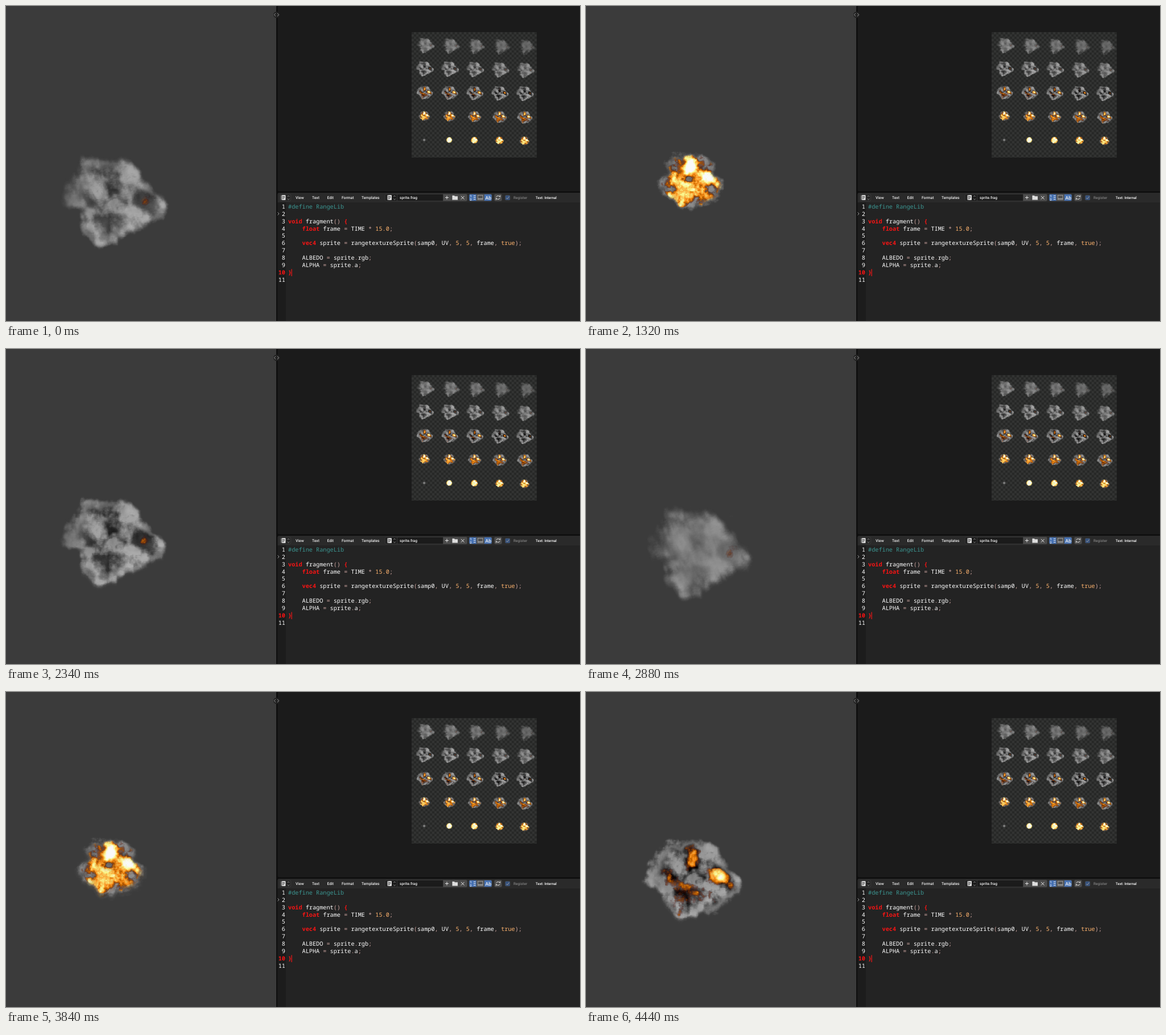
Write an HTML page with a canvas that moves like this. It is 1009 px wide and 555 px high and loops after 4500 ms.

```html
<!DOCTYPE html>
<html lang="en">
<head>
<meta charset="utf-8">
<title>Sprite sheet explosion</title>
<style>
html, body { margin: 0; width: 100%; height: 100%; overflow: hidden; background: #3b3b3b; }
svg, canvas { position: absolute; left: 0; top: 0; }
#view { left: 54px; top: 222px; }
#sheet { left: 713px; top: 46px; }
text { white-space: pre; text-rendering: geometricPrecision; }
#menu { font: 500 6.7px Roboto, sans-serif; fill: #f0f0f0; }
#code { font: 500 10.23px "Noto Sans Mono", "DejaVu Sans Mono", monospace; fill: #fff; }
.key { fill: #f81414; font-weight: 600; }
.num { fill: #ffb46e; }
.pre { fill: #3c9591; }
.sym { fill: #cda5a0; }
</style>
</head>
<body>
<svg width="1009" height="555">
  <rect x="475" width="534" height="555" fill="#0e0e0e"/>
  <rect x="477.5" width="540" height="326.500" rx="3" fill="#1b1b1b"/>
  <rect x="477.5" y="329" width="540" height="230" rx="3" fill="#232323"/>
  <rect x="477.5" y="346" width="14.500" height="209" fill="#1c1c1c"/>
  <path d="M477.500 346V332q0-3 3-3H1009V346z" fill="#2a2a2a"/>
  <circle cx="475.500" cy="15.500" r="5.500" fill="#222"/>
  <g fill="none" stroke="#aaa" stroke-width=".9">
    <path d="M474 12.800L471.300 15.500L474 18.200M477 12.800L479.700 15.500L477 18.200"/>
    <path d="M477.500 363.500L480 366L477.500 368.500"/>
  </g>
  <g stroke="#474747" stroke-width=".6">
    <rect x="481.500" y="331.500" width="19" height="12" rx="2" fill="#242424"/>
    <rect x="666.500" y="331.500" width="144" height="12" rx="2" fill="#1b1b1b"/>
    <path d="M687.500 331.500V343.500"/>
    <path d="M768.500 331.500H808.500q2 0 2 2V341.500q0 2-2 2H768.500z" fill="#4c4c4c"/>
    <path d="M782.500 331.500V343.500M796.500 331.500V343.500" stroke="#333"/>
    <rect x="814" y="331.500" width="40" height="12" rx="2" fill="#4772b3"/>
    <rect x="827" y="331.500" width="13.500" height="12" fill="#505050"/>
    <rect x="858.500" y="331.500" width="13" height="12" rx="2" fill="#4c4c4c"/>
    <rect x="877.500" y="333.500" width="8.500" height="8.500" rx="1.500" fill="#35517d"/>
  </g>
  <g fill="none" stroke="#e2e2e2" stroke-width="1">
    <path d="M775 334.500V340.500M772 337.500H778M800 335L805.500 340.500M805.500 335L800 340.500"/>
    <path d="M822 334.500H825.500M822 337.500H825.500M822 340.500H825.500"/>
    <rect x="829.500" y="333.500" width="8.500" height="7.500" stroke="#aaa" stroke-width=".8"/>
    <path d="M830 339.500H838" stroke="#aaa"/>
    <path d="M861.500 336.500q3.500-4 7 0V333.500M868.500 338.500q-3.500 4-7 0V341.500"/>
    <path d="M879.500 338L881.300 340L884.500 335.500" stroke="#9a9a9a"/>
    <path d="M494.800 336L496.500 334L498.200 336M494.800 339.500L496.500 341.500L498.200 339.500M681.300 336L683 334L684.700 336M681.300 339.500L683 341.500L684.700 339.500" stroke="#999" stroke-width=".8"/>
  </g>
  <path d="M784.500 334h3.500l1 1.200h5V341.500h-9.500z" fill="#ddd"/>
  <g id="docs"></g>
  <g id="menu"></g>
  <g id="code"></g>
  <rect x="501.500" y="463.500" width="1.200" height="12.500" fill="#f81414"/>
</svg>
<canvas id="sheet" width="220" height="221"></canvas>
<canvas id="view" width="256" height="256"></canvas>

<script>
const $ = id => document.getElementById(id);
const SIZE = 256, LEFT = 54, TOP = 222, COUNT = 25;

// Editor text
$("docs").innerHTML = [483.5, 670].map(x =>
  `<rect x="${x}" y="333" width="8" height="9" rx="1" fill="#ddd"/>` +
  `<path d="M${x + 2.5} 335.500h4M${x + 2.5} 337.500h4M${x + 2.5} 339.500h2.500M${x + 1.2} 333V342" stroke="#333" stroke-width=".9"/>`).join("");

$("menu").innerHTML = [
  [509, "View"], [538, "Text"], [564.5, "Edit"], [590, "Format"], [625, "Templates"],
  [692, "sprite.frag"], [892, "Register", 'fill="#808080" font-size="6.500"'],
  [931, "Text: Internal", 'fill="#fff" font-size="6.300"'],
  [815.5, "1", 'font-size="5.500" dy="-3.300"'], [815.5, "2", 'font-size="5.500" dy="2.700"'],
  [842.5, "Ab", 'font-size="8.500" dy=".5"']
].map(([x, s, more = ""]) => `<text x="${x}" y="340.300" ${more}>${s}</text>`).join("");

const code = `#define RangeLib

void fragment() {
    float frame = TIME * 15.0;

    vec4 sprite = rangetextureSprite(samp0, UV, 5, 5, frame, true);

    ALBEDO = sprite.rgb;
    ALPHA = sprite.a;
}
`;
const token = /(#.*)|(\b(?:void|float|vec4)\b|[{}])|(\btrue\b|\b\d[\d.]*)|([()=*;,.]+)/g;
const paint = s => s.replace(token, (m, pre, key, num) =>
  `<tspan class="${pre ? "pre" : key ? "key" : num ? "num" : "sym"}">${m}</tspan>`);
$("code").innerHTML = code.split("\n").map((s, n) => {
  const y = 356.6 + 12.97 * n;
  return `<text x="491" y="${y}" text-anchor="end"${n == 9 ? ' class="key"' : ""}>${n + 1}</text>` +
    `<text x="496" y="${y}">${paint(s)}</text>`;
}).join("");

// Maths helpers
const clamp = v => v < 0 ? 0 : v > 1 ? 1 : v;
const mix = (a, b, k) => a + (b - a) * k;
const smooth = (a, b, v) => { v = clamp((v - a) / (b - a)); return v * v * (3 - 2 * v); };

// Piecewise linear curve through position, value pairs
function curve(i, ...p) {
  if (i <= p[0]) return p[1];
  for (let k = 2; k < p.length; k += 2)
    if (i <= p[k]) return mix(p[k - 1], p[k + 1], (i - p[k - 2]) / (p[k] - p[k - 2]));
  return p[p.length - 1];
}

let seed = 7;
function random() {
  seed = (Math.imul(seed, 1664525) + 1013904223) >>> 0;
  return seed / 4294967296;
}

// Tiling fractal noise; billow folds it into cauliflower creases
function makeNoise(billow) {
  const out = new Float32Array(SIZE * SIZE);
  for (let p = 8, amp = 0.48; p <= 128; p *= 2, amp *= 0.55) {
    const grid = Array.from({ length: p * p }, random);
    for (let y = 0; y < SIZE; y++) for (let x = 0; x < SIZE; x++) {
      const gx = x * p / SIZE, gy = y * p / SIZE, x0 = gx | 0, y0 = gy | 0;
      const x1 = (x0 + 1) % p, y1 = (y0 + 1) % p;
      const u = smooth(0, 1, gx - x0), v = smooth(0, 1, gy - y0);
      const n = mix(mix(grid[y0 * p + x0], grid[y0 * p + x1], u), mix(grid[y1 * p + x0], grid[y1 * p + x1], u), v);
      out[y * SIZE + x] += amp * (billow ? Math.abs(2 * n - 1) : n);
    }
  }
  return out;
}
const cloud = makeNoise(false), puff = makeNoise(true);
const sample = (f, x, y) => f[(Math.floor(y) & 255) * SIZE + (Math.floor(x) & 255)];

// Outline radii, clockwise from the right in steps of 18 degrees
const ball = Array(20).fill(31);
const blast = [55, 60, 57, 51, 52, 53, 53, 52, 52, 60, 56, 50, 58, 58, 52, 53, 51, 55, 58, 50];
const embers = [81, 84, 73, 73, 68, 69, 75, 71, 58, 76, 83, 78, 80, 76, 66, 72, 67, 76, 67, 70];
const smoke = [98, 92, 77, 68, 67, 74, 88, 90, 70, 62, 96, 88, 84, 92, 79, 77, 84, 80, 67, 80];
const haze = [98, 88, 70, 62, 72, 82, 88, 82, 70, 72, 80, 80, 84, 86, 82, 80, 80, 78, 78, 88];

function makeSprite(i) {
  const canvas = document.createElement("canvas");
  canvas.width = canvas.height = SIZE;
  const ctx = canvas.getContext("2d"), image = ctx.createImageData(SIZE, SIZE), px = image.data;
  const cx = curve(i, 1, 182, 5, 183, 10, 187, 16, 187, 24, 202);
  const cy = curve(i, 1, 298, 5, 308, 10, 325, 16, 340, 24, 368);
  const outline = ball.map((r, k) => curve(i, 0, 14, 1, r, 5, blast[k], 10, embers[k], 16, smoke[k], 24, haze[k]));
  const unit = curve(i, 0, 14, 1, 31, 5, 54, 10, 75, 16, 82, 24, 84);

  const wobble = curve(i, 0, 3, 1, 5, 3, 16, 5, 20, 10, 26, 16, 30, 24, 50);
  const soft = curve(i, 0, 3, 1, 4, 5, 12, 10, 12, 16, 18, 20, 28, 24, 46);
  const fade = curve(i, 16, 0.97, 20, 0.82, 24, 0.55);
  const dark = curve(i, 5, 0.7, 8, 1, 13, 1, 15, 0.75, 17, 0.6, 20, 0.25, 24, 0);
  const heat = curve(i, 1, 0.95, 2, 0.75, 3, 0.6, 5, 0.36, 7, 0.14, 10, -0.06, 12, -0.25, 14, -0.9);
  const range = curve(i, 1, 0.5, 3, 1.8, 5, 2.6, 10, 2.4);
  const halo = curve(i, 1, -2, 3, 0, 5, 5, 10, 12);
  const topHeat = curve(i, 5, 0.75, 10, 0.15), lowHeat = curve(i, 5, 0.5, 10, 0.28), sideHeat = curve(i, 5, 0.55, 10, 0.62);
  const late = clamp((i - 10) / 6);

  for (let row = 0; row < SIZE; row++) for (let col = 0; col < SIZE; col++) {
    const x = col + LEFT, y = row + TOP, dx = x - cx, dy = y - cy;
    const turn = (Math.atan2(dy, dx) / Math.PI * 10 + 20) % 20, k = Math.floor(turn);
    let depth = mix(outline[k], outline[(k + 1) % 20], smooth(0, 1, turn - k)) - Math.hypot(dx, dy);
    if (depth < -25) continue;

    const u = dx / unit * 92, v = dy / unit * 92 - i;
    const n = sample(cloud, u, v), m = sample(cloud, u + 97, v + 141), b = sample(puff, u + 30, v + 60);
    depth += (n - 0.5) * wobble + (b - 0.35) * wobble * 0.6;
    if (depth <= 0) continue;

    const spot = (a, c, w) => Math.exp(-((dx / unit - a) ** 2 + (dy / unit - c) ** 2) / w);
    const top = spot(0.03, -0.38, 0.11), side = spot(0.55 + 0.25 * late, -0.04, 0.07), low = spot(-0.12, 0.58, 0.08);
    const inner = smooth(4, 22, depth);
    const shade = clamp(0.42 + (m - 0.5) * 2.8 + (0.35 - b) * 1.6 + late * (0.5 * side + 0.4 * low + 0.1 * top)) * mix(0.25, 1, smooth(112, 160, x));
    const grey = i < 1 ? 126 : curve(i, 5, 125, 10, 146, 16, 158, 24, 150) + (n - 0.5) * 80 - inner * dark * shade * 145;
    const hot = heat + (m - 0.5) * range + (b - 0.35) * 0.7 + topHeat * top + sideHeat * side + lowHeat * low
      - 0.3 * (1 - smooth(0, unit * 0.4, depth));
    const fire = i < 1 ? 0 : clamp(hot * 3) * smooth(halo, halo + 8, depth);

    const o = (row * SIZE + col) * 4;
    px[o] = mix(grey, 255 * clamp(hot * 1.75 + 0.08), fire);
    px[o + 1] = mix(grey, 255 * clamp(hot * 1.3 - 0.12), fire);
    px[o + 2] = mix(grey, 255 * clamp(hot * 1.35 - 0.6), fire);
    px[o + 3] = 255 * fade * smooth(0, soft, depth) * mix(1, smooth(80, 142, x), late);
  }
  ctx.putImageData(image, 0, 0);
  return canvas;
}
const sprites = Array.from({ length: COUNT }, (_, i) => makeSprite(i));

// Sheet, first sprite at the bottom left
const sheet = $("sheet").getContext("2d");
for (let y = 0; y < 221; y += 4) for (let x = 0; x < 220; x += 4) {
  sheet.fillStyle = (x + y) / 4 % 2 ? "#323332" : "#272827";
  sheet.fillRect(x, y, 4, 4);
}
sheet.imageSmoothingQuality = "high";
sprites.forEach((s, i) => sheet.drawImage(s, i % 5 * 44, (4 - Math.floor(i / 5)) * 44.2, 44, 44.2));

// Crossfade between neighbouring sprites, stepped every 60 ms
const view = $("view").getContext("2d");
function draw() {
  const t = Math.floor(performance.now() % 4500 / 60) * 60;
  const pos = ((t - 825) / 100 + COUNT) % COUNT, i = Math.floor(pos), k = pos - i;
  view.globalCompositeOperation = "source-over";
  view.clearRect(0, 0, SIZE, SIZE);
  view.globalAlpha = 1 - k;
  view.drawImage(sprites[i], 0, 0);
  view.globalCompositeOperation = "lighter";
  view.globalAlpha = k;
  view.drawImage(sprites[(i + 1) % COUNT], 0, 0);
  requestAnimationFrame(draw);
}
draw();
</script>
</body>
</html>
```
